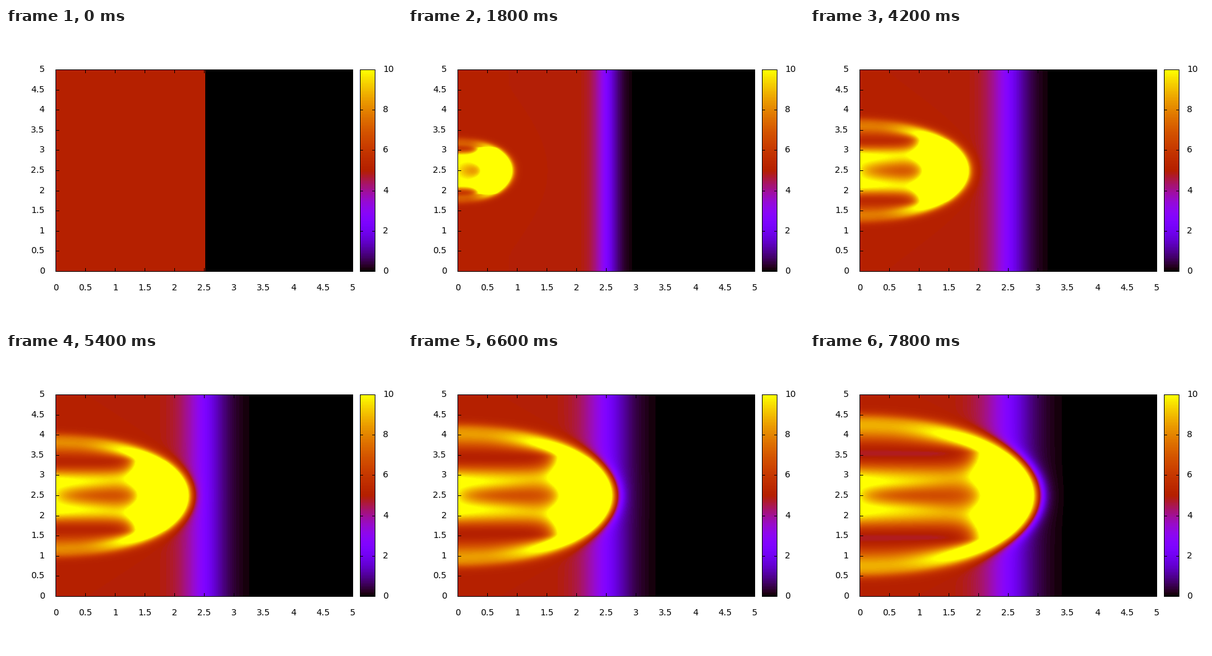
A matplotlib script for the animation above (8 s loop, 640 by 480 pixels).

```python
import math

import matplotlib.pyplot as plt
import numpy as np
from matplotlib.animation import FuncAnimation
from matplotlib.patches import Rectangle

WIDTH, HEIGHT, DPI = 640, 480, 100
LEFT, RIGHT, TOP, BOTTOM = 80, 560, 67, 393
BAR_LEFT, BAR_RIGHT = 572, 596
STEP_FRAMES = 3
HEAD = 13.5

x = (np.arange(LEFT + 1, RIGHT) - LEFT) / (RIGHT - LEFT) * 5
y = (BOTTOM - np.arange(TOP + 1, BOTTOM)) / (BOTTOM - TOP) * 5
dist = np.abs(y - 2.5)[:, None]
erf = np.vectorize(math.erf)


def palette(value):
    """Colours for values 0..10 in 128 steps, black-violet-red-yellow."""
    level = np.clip(np.floor(value / 10 * 128), 0, 127) / 127
    rgb = [np.sqrt(level), level**3, np.sin(2 * np.pi * level)]
    return np.clip(np.stack(rgb, axis=-1), 0, 1)


def sigmoid(z):
    return 0.5 * (1 + np.tanh(z / 2))


def ease(start, end, v):
    t = np.clip((v - start) / (end - start), 0, 1)
    return t * t * (3 - 2 * t)


def ambient(step):
    """Diffusing vertical interface between 5 and 0."""
    if step == 0:
        return np.where(x < 2.515, 5.0, 0.0)
    return 2.5 * (1 - erf((x - 2.505) / (0.1155 * math.sqrt(step))))


def plume(step):
    """Values inside the plume and the soft mask of its elliptic front."""
    a = 0.15 + 0.135 * step - 0.001 * step**2
    b = 0.45 + 0.0595 * step
    tip = -0.1 + 0.0816 * step
    spread = 0.035 + 0.0035 * step

    def into_head(value, shift):
        return value + (HEAD - value) * sigmoid((x - tip - shift) / spread)

    # Ridges and troughs from the axis outwards
    core = into_head(6.6 + 3.2 * np.exp(-x / 0.35), 0.02)
    inner = into_head(10.5 - 1.25 * x, -0.08)
    trough = into_head(6.35 - 0.06 * step, -0.05)
    side = 6.7 + 0.085 * step
    outer = side + (HEAD - side) * ease(0.15, 0.95, x / a)

    inner_d = 0.34 + 0.006 * step * np.clip(x / max(tip, 0.1), 0, 1) ** 2
    trough_d = 0.4 + 0.0248 * step
    rim = b * np.sqrt(np.clip(1 - (x / a) ** 2, 0, 1))
    outer_d = np.maximum(rim - 0.11 - 0.0045 * step, trough_d + 0.05)
    inner_d = np.minimum(inner_d, trough_d - 0.05)

    inside = (core + (inner - core) * ease(0, inner_d, dist)
              + (trough - inner) * ease(inner_d, trough_d, dist)
              + (outer - trough) * ease(trough_d, outer_d, dist))

    rho = np.hypot(x / a, dist / b)
    depth = (1 - rho) * rho / np.hypot(x / a**2, dist / b**2)
    return inside, sigmoid(depth / (0.03 + 0.00135 * step))


def field(step):
    base = np.tile(ambient(step), (len(y), 1))
    if step == 0:
        return base
    inside, mask = plume(step)
    return base + (inside - base) * mask


fig = plt.figure(figsize=(WIDTH / DPI, HEIGHT / DPI), dpi=DPI, facecolor="white")
ax = fig.add_axes([0, 0, 1, 1])
ax.axis("off")


def picture(values, left, right):
    return ax.imshow(palette(values), extent=(left + 1, right, BOTTOM, TOP + 1),
                     interpolation="nearest", aspect="auto", zorder=1)


def block(left, top, width, height):
    ax.add_patch(Rectangle((left, top), width, height, color="black", lw=0,
                           antialiased=False, zorder=2))


def frame(left, right):
    for row in (TOP, BOTTOM):
        block(left, row, right - left + 1, 1)
    for col in (left, right):
        block(col, TOP, 1, BOTTOM - TOP + 1)


def label(px, py, value, align):
    ax.text(px, py + 5, f"{value:g}", ha=align, va="baseline",
            family="DejaVu Sans", fontsize=14 * 72 / DPI, color="black")


heat = picture(field(0), LEFT, RIGHT)
bar_values = 10 * (BOTTOM - np.arange(TOP + 1, BOTTOM)) / (BOTTOM - TOP)
picture(np.tile(bar_values[:, None], (1, BAR_RIGHT - BAR_LEFT - 1)), BAR_LEFT, BAR_RIGHT)
frame(LEFT, RIGHT)
frame(BAR_LEFT, BAR_RIGHT)

for i in range(11):
    col = LEFT + 48 * i
    row = round(BOTTOM - 32.6 * i)
    block(col, TOP, 1, 6)
    block(col, BOTTOM - 5, 1, 6)
    block(LEFT, row, 6, 1)
    block(RIGHT - 5, row, 6, 1)
    label(col + 0.5, 419, i / 2, "center")
    label(62.5, row - 1, i / 2, "right")
    if i % 2 == 0:
        block(BAR_LEFT, row, 5, 1)
        block(BAR_RIGHT - 4, row, 5, 1)
        label(609.5, row - 1, i, "left")

ax.set_xlim(0, WIDTH)
ax.set_ylim(HEIGHT, 0)


def update(n):
    heat.set_data(palette(field(n // STEP_FRAMES)))
    return [heat]


anim = FuncAnimation(fig, update, frames=80, interval=100, repeat=True,
                     repeat_delay=0, blit=False)
plt.show()
```
